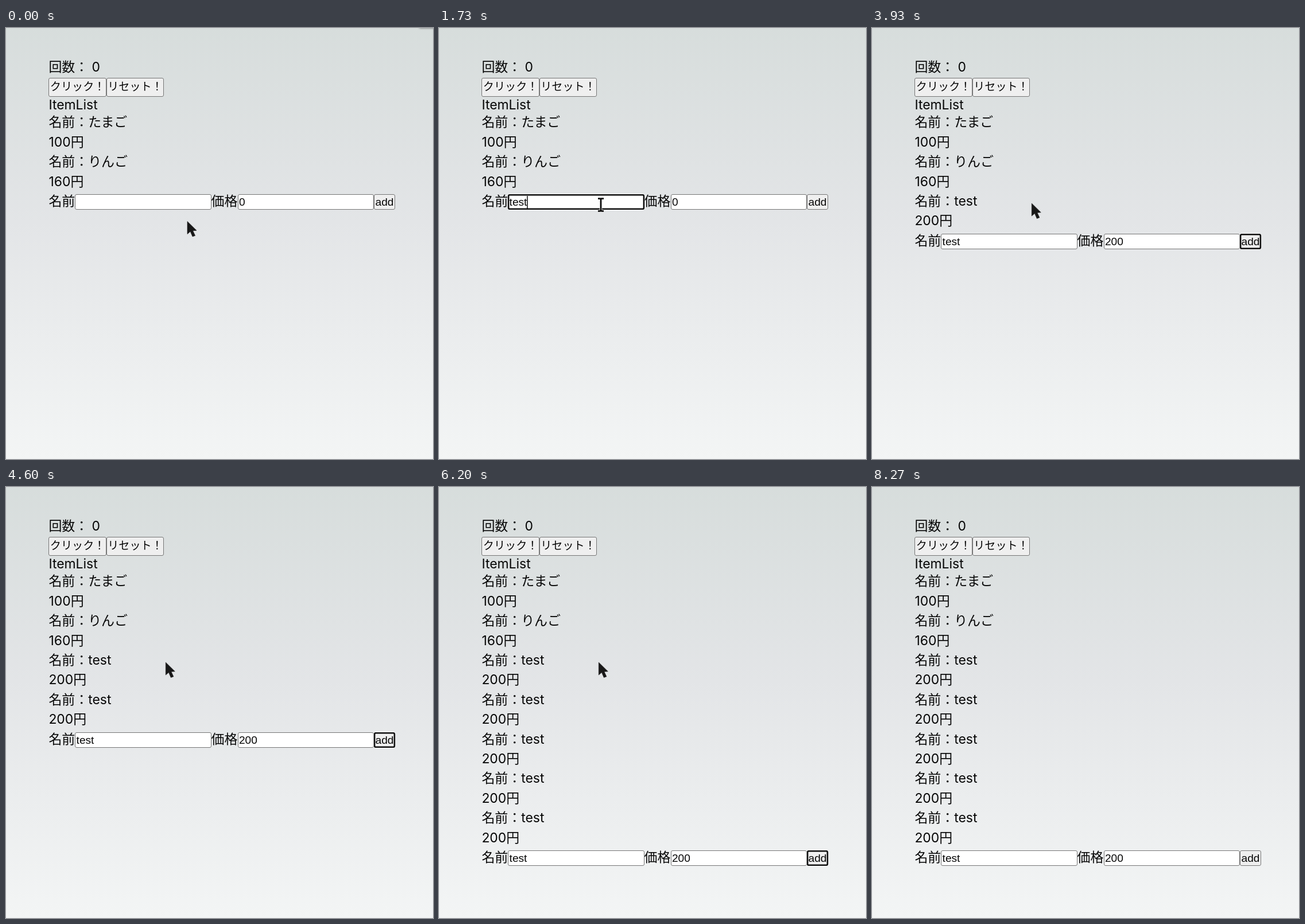
These frames come from a looping animation (744 px wide and 752 px high, 8.59 s). An HTML page:

```html
<!DOCTYPE html>
<html lang="ja">
<head>
<meta charset="utf-8">
<title>ItemList</title>
<style>
  html, body { margin: 0; width: 100%; height: 100%; overflow: hidden; }
  svg { display: block; width: 744px; height: 752px; }
  text {
    font: 22.93px Inter, "Noto Sans CJK JP DemiLight", "Noto Sans CJK JP", "Noto Sans CJK", sans-serif;
    fill: #060606; white-space: pre;
  }
  .ui { font: 19.11px "Liberation Sans", "Noto Sans CJK JP DemiLight", "Noto Sans CJK JP", "Noto Sans CJK", sans-serif; }
  .box { stroke: #767676; stroke-width: 1; }
  .field { fill: #fff; }
  .button { fill: #efefef; }
  .hover { stroke: #363636; }
  .ring { fill: none; stroke: #101010; stroke-width: 2.6; }
  .halo { fill: none; stroke: #fff; stroke-opacity: .7; stroke-width: 1; }
</style>
</head>
<body>
<svg viewBox="0 0 744 752">
  <defs>
    <linearGradient id="sky" x2="0" y2="1">
      <stop offset="0" stop-color="#d7dddc"/>
      <stop offset=".45" stop-color="#e3e5e7"/>
      <stop offset="1" stop-color="#f3f5f5"/>
    </linearGradient>
    <filter id="blur" x="-50%" y="-50%" width="200%" height="200%">
      <feGaussianBlur stdDeviation="1.4"/>
    </filter>
  </defs>
  <rect width="744" height="752" fill="url(#sky)"/>
  <rect id="shadow" x="719" y="-14" width="40" height="15" rx="4" fill="#8d9292" filter="url(#blur)"/>

  <text x="74.4" y="76">回数： 0</text>
  <rect class="box button" x="74.5" y="87.5" width="100" height="32" rx="2.5"/>
  <rect class="box button" x="175.5" y="87.5" width="99" height="32" rx="2.5"/>
  <text class="ui" x="76.8" y="109">クリック！</text>
  <text class="ui" x="177.2" y="109">リセット！</text>
  <text x="74.4" y="142">ItemList</text>
  <g id="list"></g>

  <g id="form">
    <text x="74.4" y="310">名前</text>
    <text x="357.6" y="310">価格</text>
    <rect id="nameBox" class="box field" x="120.5" y="290.5" width="237" height="26" rx="2.5"/>
    <rect class="box field" x="404.5" y="290.5" width="236" height="26" rx="2.5"/>
    <rect class="box button" x="641.5" y="290.5" width="36" height="26" rx="2.5"/>
    <g id="focus">
      <rect id="halo" class="halo" y="289.5" height="28" rx="3.5"/>
      <rect id="ring" class="ring" y="291.3" height="24.4" rx="2.2"/>
    </g>
    <rect id="mark" x="406" y="293" width="10.6" height="22" fill="#0078d7"/>
    <text id="name" class="ui" x="122.6" y="310"></text>
    <text id="price" class="ui" x="405.9" y="310"></text>
    <text class="ui" x="643.6" y="310">add</text>
    <rect id="caret" y="293" width="1.4" height="22" fill="#000"/>
  </g>

  <path id="arrow" fill="#181818" stroke="#181818" stroke-width=".6" d="M0 0V22L5.2 17.6L9 26.4L13.6 24.8L9.6 16.2L16 15.8Z"/>
  <g id="beam" fill="none">
    <path stroke="#fff" stroke-width="4.4" d="M-5 -10.6H5M0 -11V11M-5 10.6H5"/>
    <path stroke="#0b0b0b" stroke-width="2.8" d="M-5 -10.8H-1.2L0 -9.4L1.2 -10.8H5M0 -9.5V9.5M-5 10.8H-1.2L0 9.4L1.2 10.8H5"/>
  </g>
</svg>
<script>
const LOOP = 8590, ROW = 34.4;
const el = {};
document.querySelectorAll('[id]').forEach(n => el[n.id] = n);

// Step tables: [start time, value]
const names = [[0, ''], [1400, 't'], [1470, 'te'], [1670, 'tes'], [1730, 'test']];
const prices = [[0, '0'], [2730, '2'], [2870, '20'], [3000, '200']];
const counts = [[0, 2], [3930, 3], [4600, 4], [5200, 5], [5670, 6], [6200, 7]];
const focuses = [[0, ''], [870, 'name'], [2000, 'price'], [3330, 'add'], [8270, '']];
const pointer = [
  [0, ['arrow', 316, 337.5]], [70, ['arrow', 307, 333]], [137, ['arrow', 293, 326]],
  [203, ['arrow', 282, 320.5]], [270, ['arrow', 277, 318.5]],
  [600, ['beam', 280, 311]], [670, ['beam', 282, 308.5]],
  [3930, ['arrow', 278.3, 306]],
  [6670, ['arrow', 279, 325]], [6737, ['arrow', 280, 387]], [6803, ['arrow', 281, 475]],
  [6870, ['arrow', 282, 568]], [6930, ['beam', 283, 648]], [7000, ['arrow', 283, 716]],
  [7070, ['', 0, 0]]
];
// Left edge and width of each focusable control
const frames = { name: [120, 238], price: [404, 237], add: [641, 37] };

const at = (table, t) => table.reduce((v, [start, value]) => t >= start ? value : v, table[0][1]);
const show = (node, on) => node.setAttribute('visibility', on ? 'visible' : 'hidden');
const set = (node, attrs) => { for (const k in attrs) node.setAttribute(k, attrs[k]); };
const write = (node, s) => { if (node.textContent !== s) node.textContent = s; };

function addText(parent, y, s) {
  const text = document.createElementNS('http://www.w3.org/2000/svg', 'text');
  set(text, { x: 74.4, y: Math.round(y) });
  text.textContent = s;
  parent.append(text);
  return text;
}

const items = [['たまご', 100], ['りんご', 160], ...Array(5).fill(['test', 200])].map(([name, yen], i) => {
  const y = 172.4 + i * 2 * ROW;
  return [addText(el.list, y, '名前：' + name), addText(el.list, y + ROW, yen + '円')];
});

function draw(t) {
  const count = at(counts, t), focus = at(focuses, t);
  const name = at(names, t), price = at(prices, t);
  const [kind, px, py] = at(pointer, t);

  items.forEach((lines, i) => lines.forEach(line => show(line, i < count)));
  set(el.form, { transform: `translate(0 ${Math.round((count - 2) * 2 * ROW)})` });
  write(el.name, name);
  write(el.price, price);
  el.nameBox.classList.toggle('hover', kind === 'beam');
  show(el.shadow, t < 930);

  show(el.focus, focus);
  if (focus) {
    const [x, width] = frames[focus];
    set(el.halo, { x: x - .5, width: width + 1 });
    set(el.ring, { x: x + 1.1, width: width - 2.2 });
  }

  const selected = focus === 'price' && price === '0';
  show(el.mark, selected);
  el.price.style.fill = selected ? '#fff' : '';
  const typing = (focus === 'name' || focus === 'price') && !selected;
  show(el.caret, typing);
  if (typing) {
    const field = el[focus];
    const width = field.textContent ? field.getComputedTextLength() : 0;
    set(el.caret, { x: +field.getAttribute('x') + width - .2 });
  }

  for (const id of ['arrow', 'beam']) {
    show(el[id], kind === id);
    set(el[id], { transform: `translate(${px} ${py})` });
  }
}

const begin = performance.now();
function tick() {
  draw((performance.now() - begin) % LOOP);
  requestAnimationFrame(tick);
}
tick();
</script>
</body>
</html>
```
